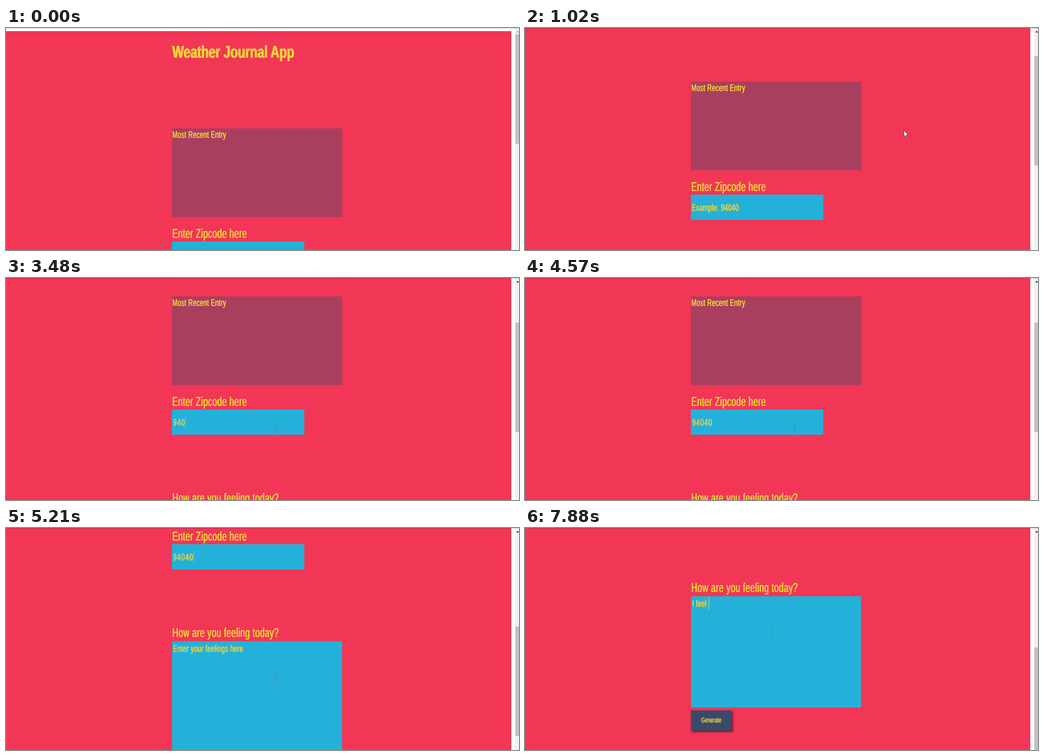
Recreate the animation shown at these times as an HTML page. Size 1135 by 493 pixels, loop 8 s.

```html
<!DOCTYPE html>
<html lang="en">
<head>
<meta charset="utf-8">
<title>Weather Journal App</title>
<style>
  html, body { margin: 0; width: 100%; height: 100%; overflow: hidden; background: #fff; }
  #stage { position: relative; width: 1135px; height: 493px; overflow: hidden; }
  #stage div, #stage svg, .caret { position: absolute; }
  #page { left: 0; top: 0; width: 1118px; height: 1300px; will-change: transform; }
  #red { top: 7px; width: 1118px; height: 1293px; background: #f23656; }
  #entry { left: 367px; top: 223px; width: 377px; height: 197px; background: #a93f5e; }
  #input { left: 367px; top: 474px; width: 293px; height: 56px; background: #23b1da; }
  #area {
    left: 367px; top: 689px; width: 377px; height: 248px; box-sizing: border-box;
    background: #23b1da; border: 1px solid #767f8c;
  }
  #button {
    left: 367px; top: 943px; width: 91px; height: 45px; background: #3b4a6b;
    border-radius: 1px; box-shadow: 2px 3px 4px rgba(0, 0, 0, .55);
  }
  #grip { left: 735px; top: 929px; }

  /* condensed face; --y is the baseline */
  .t {
    left: var(--x); top: calc(var(--y) - .3465em); line-height: 0; white-space: pre;
    font-family: "Liberation Sans", Arial, sans-serif; font-size: 21.3px; letter-spacing: .035em;
    color: #f2d23c; transform: scaleX(.635); transform-origin: 0 0;
    text-rendering: geometricPrecision; text-shadow: .026em 0, -.026em 0;
  }
  .head { font-size: 28.5px; }
  .title { font-size: 38px; font-weight: bold; letter-spacing: 0; transform: scaleX(.71); }
  .small { font-size: 15.9px; }
  #zip { letter-spacing: .11em; }
  .caret { top: calc(.3465em - 21px); width: 1.56px; height: 27px; background: #e8d64c; }

  #bar { left: 1126px; top: 0; width: 9px; height: 493px; background: #f1f1f1; }
  #thumb { left: 1px; top: 14px; width: 8px; height: 243px; background: #c1c1c1; }
  #up { left: 3px; top: 6px; border: 3.5px solid transparent; border-top: 0; border-bottom: 4px solid; }
  #line { left: 0; top: 0; width: 1135px; height: 1px; background: rgba(0, 0, 0, .22); }
  #arrow, #beam { left: 0; top: 0; overflow: visible; }
</style>
</head>
<body>
<div id="stage">
  <div id="page">
    <div id="red"></div>
    <div class="t title" style="--x:368px;--y:67px">Weather Journal App</div>
    <div id="entry"></div>
    <div class="t" style="--x:367.5px;--y:244px">Most Recent Entry</div>
    <div class="t head" style="--x:367.5px;--y:467px">Enter Zipcode here</div>
    <div id="input"></div>
    <div class="t" id="zipHint" style="--x:369px;--y:510px">Example: 94040</div>
    <div class="t" id="zip" style="--x:369.5px;--y:510px"><span></span><i class="caret"></i></div>
    <div class="t head" style="--x:367.5px;--y:681px">How are you feeling today?</div>
    <div id="area"></div>
    <svg id="grip" width="8" height="8"><path d="M0 7.500L7.500 0M4 7.500L7.500 4" stroke="#8fb4bf"/></svg>
    <div class="t" id="moodHint" style="--x:370px;--y:713px">Enter your feelings here</div>
    <div class="t" id="mood" style="--x:370px;--y:713px"><span></span><i class="caret"></i></div>
    <div id="button"></div>
    <div class="t small" style="--x:390px;--y:972px">Generate</div>
  </div>
  <div id="bar"><div id="thumb"></div><div id="up"></div></div>
  <div id="line"></div>
  <svg id="arrow" width="12" height="18">
    <path d="M.5 .5V14L3.600 11.200L5.700 16L7.800 15.100L5.700 10.500H9.800Z" fill="#fff" stroke="#222" stroke-width=".8"/>
  </svg>
  <svg id="beam" width="9" height="15">
    <path d="M-4 -7H-1Q0 -7 0 -6Q0 -7 1 -7H4M0 -6V6M-4 7H-1Q0 7 0 6Q0 7 1 7H4" fill="none" stroke-width="1.2"/>
  </svg>
</div>
<script>
  const LOOP = 8000;
  const NOTCH = 89;
  const $ = id => document.getElementById(id);
  const show = (el, on) => { el.style.visibility = on ? 'visible' : 'hidden'; };

  // Eased progress from 0 to 1, starting at `start`
  function ease(t, start, duration) {
    const p = Math.min(1, Math.max(0, (t - start) / duration));
    return p * p * (3 - 2 * p);
  }

  // Two single wheel turns, then two double ones
  const scrollAt = t => NOTCH * (
    1.02 * ease(t, 500, 280) + 1.02 * ease(t, 970, 210) +
    2 * ease(t, 4680, 260) + 2 * ease(t, 5080, 284));

  function pointerAt(t) {
    const enter = ease(t, 140, 400);
    const toZip = ease(t, 1300, 410);
    const toMood = ease(t, 5440, 190);
    return {
      x: 760 + 78 * enter - 240.5 * toZip - 52 * toMood,
      y: -30 + 257 * enter + 107.5 * toZip - 106 * toMood
    };
  }

  function drawField(id, text, t, focus, blur, firstKey, gap) {
    const count = Math.min(text.length, Math.max(0, Math.floor((t - firstKey) / gap) + 1));
    const lastKey = count ? firstKey + (count - 1) * gap : focus;
    const [span, caret] = $(id).children;
    span.textContent = text.slice(0, count);
    show($(id + 'Hint'), !count);
    show(caret, t >= focus && t < blur && (t - lastKey) % 1000 < 500);
  }

  function drawPointer({ x, y }, scroll) {
    const isBeam = x < 660;
    const docY = y + scroll;
    const onField = docY > 474 && docY < 530 || docY > 689;
    show($('arrow'), !isBeam);
    show($('beam'), isBeam);
    $(isBeam ? 'beam' : 'arrow').style.transform = `translate(${x}px, ${y}px)`;
    $('beam').style.stroke = onField ? '#a8656e' : '#8a9a80';
  }

  function draw() {
    const t = performance.now() % LOOP;
    const scroll = Math.round(scrollAt(t));
    $('page').style.transform = `translateY(${-scroll}px)`;
    $('thumb').style.transform = `translateY(${scroll * .467}px)`;
    $('up').style.borderBottomColor = scroll ? '#333' : '#a3a3a3';
    drawPointer(pointerAt(t), scroll);
    drawField('zip', '94040', t, 1970, 5820, 3020, 220);
    drawField('mood', 'I feel ', t, 5820, LOOP, 6710, 195);
    requestAnimationFrame(draw);
  }
  draw();
</script>
</body>
</html>
```
